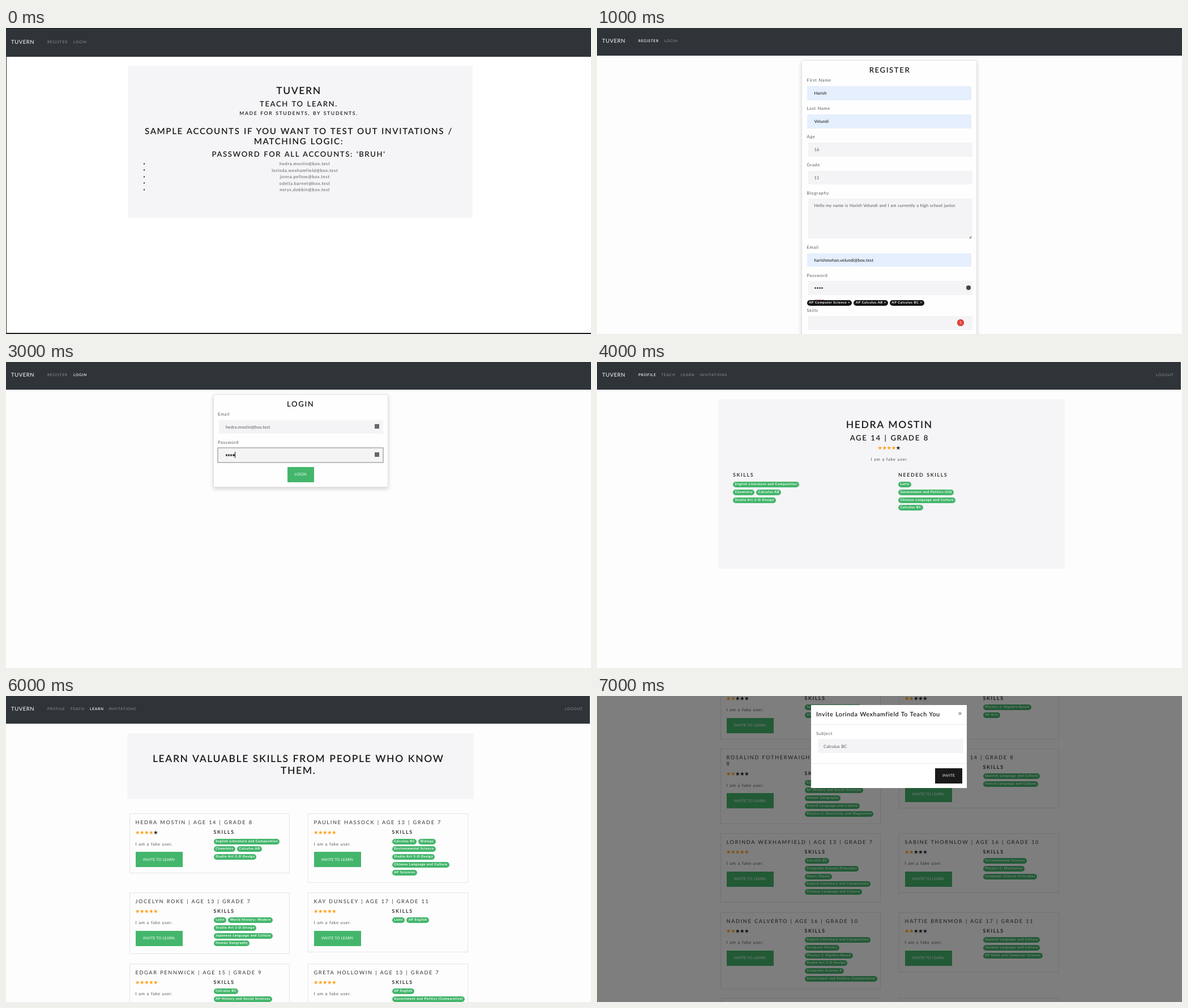
These frames come from a looping animation (1033x542 px, 8 s). An HTML page:

```html
<!DOCTYPE html>
<html lang="en">
<head>
<meta charset="utf-8">
<title>Peer teaching site tour</title>
<style>
html, body { margin: 0; width: 100%; height: 100%; overflow: hidden; background: #fff; }
#stage {
  position: relative; width: 1033px; height: 542px; overflow: hidden;
  font: 7.6px Lato, "Open Sans", sans-serif; color: #55595c;
  text-rendering: geometricPrecision;
}
#stage div { position: absolute; box-sizing: border-box; }
#stage .scene {
  inset: 0; overflow: hidden; background: #fdfdfd; visibility: hidden;
  animation: show 8s step-end infinite;
  animation-delay: calc(var(--i) * 1s - 8s);
}
@keyframes show {
  0% { visibility: visible; }
  12.5%, 100% { visibility: hidden; }
}

/* type; text is centred vertically on its top coordinate */
.t { line-height: 0; white-space: nowrap; }
.mid { width: 800px; text-align: center; }
.body { letter-spacing: .61px; word-spacing: .5px; }
.field { letter-spacing: .1px; word-spacing: .5px; }
.auto { color: #111; }
.h1, .h2, .h3, .h4, .title, .sub {
  color: #1a1a1a; font-weight: 600; letter-spacing: 1.62px; word-spacing: 1px; text-transform: uppercase;
}
.h1 { font-size: 17.5px; }
.h2 { font-size: 15.1px; }
.h3 { font-size: 13.1px; }
.h4 { font-size: 8.7px; }
.sub { font-size: 8.9px; }
.title { font-size: 9.2px; font-weight: 500; color: #444; word-spacing: .6px; }
.ask { font-size: 10.8px; font-weight: 600; color: #1a1a1a; letter-spacing: .54px; word-spacing: .6px; }
.close { font-size: 12px; color: #555; }
.brand { font-size: 9.5px; letter-spacing: .54px; color: #fff; }
.link { font-size: 6.5px; letter-spacing: .8px; color: #93969a; }
.on { color: #fff; font-weight: 600; }
.tip { font-size: 6.3px; letter-spacing: .3px; color: #eee; }

/* boxes */
.nav { background: #2f3439; }
.jumbo { background: #f5f5f7; }
.card { border: 1px solid #e4e4e4; }
.panel { background: #fefefe; border: 1px solid #e2e2e2; border-radius: 3px; box-shadow: 0 3px 7px rgba(0, 0, 0, .17); }
.input { background: #f4f4f6; }
.filled { background: #e5effd; }
.focus { background: #f4f4f5; border: 2px solid #bcbcbe; }
.btn {
  display: flex; align-items: center; justify-content: center; white-space: nowrap;
  background: #44b66c; color: #fff; font-size: 6.6px; letter-spacing: .15px;
}
.dark { background: #1a1a1a; }
.dot { border-radius: 50%; background: #444; }
.icon { background: #666; }
.rule { background: #e6e6e6; }
.star { background: #222; clip-path: polygon(50% 0, 62% 36%, 100% 36%, 69% 59%, 81% 96%, 50% 73%, 19% 96%, 31% 59%, 0 36%, 38% 36%); }
.gold { background: #ffa21f; }
.pills { display: flex; gap: 3px; height: 10px; }
.pills span {
  padding: 0 3.2px 0 3.7px; border-radius: 5px; line-height: 10px; white-space: nowrap;
  background: #44b66c; color: #fff; font-size: 5.8px; font-weight: 700;
  letter-spacing: .56px; word-spacing: .2px;
}
.tags span { background: #151515; }
.arrow { background: #151515; clip-path: polygon(0 0, 100% 0, 50% 100%); }
.grip { background: #999; clip-path: polygon(100% 0, 100% 100%, 0 100%); }
.shade { background: rgba(0, 0, 0, .5); }
</style>
</head>
<body>
<div id="stage"></div>
<script>
const BRAND = 'TUVERN', MAIL = '@box.test';

const box = (x, y, w, h, cls, inner = '') =>
  `<div class="${cls}" style="left:${x}px;top:${y}px;width:${w}px;height:${h}px">${inner}</div>`;
const text = (x, y, cls, str) =>
  `<div class="t ${cls}" style="left:${x}px;top:${y}px">${str}</div>`;
const mid = (x, y, cls, str) => text(x - 400, y, 'mid ' + cls, str);
const repeat = (n, fn) => Array.from({ length: n }, (_, i) => fn(i)).join('');
const dots = (x, y) => repeat(4, i => box(x + i * 4.1, y - 1.6, 3.3, 3.3, 'dot'));
const stars = (x, y, n) =>
  repeat(5, i => box(x + i * 8.05, y - 3.7, 7.4, 7.4, i < n ? 'star gold' : 'star'));

// one row of pills; labels are separated by "|"
const pills = (x, y, labels, cls = '') =>
  `<div class="pills ${cls}" style="left:${x}px;top:${y - 5}px">` +
  labels.split('|').map(s => `<span>${s}</span>`).join('') + '</div>';

function nav(y, h, w, links, active) {
  return box(0, 0, w, h, 'nav') + text(9, y, 'brand', BRAND) +
    links.map(([x, s]) => text(x, y, s === active ? 'link on' : 'link', s)).join('');
}
const guest = [[73, 'REGISTER'], [119, 'LOGIN']];
const member = [[73, 'PROFILE'], [113.5, 'TEACH'], [148, 'LEARN'], [181.5, 'INVITATIONS'], [987, 'LOGOUT']];

// person: [name, age, grade, rating, ...pill rows]
function card(col, y, person, verb, head, wrap = false) {
  const [name, age, grade, rating, ...rows] = person;
  const x = col ? 532.5 : 217.5, tx = x + 11, px = x + 149;
  const d = y + (wrap ? 11.5 : 0);
  const h = Math.max(106, 109.5 + (rows.length - 4) * 13.75) + d - y;
  const line = `${name} | Age ${age} | Grade`;
  return box(x, y, 283, h, 'card') +
    (wrap ? text(tx, y + 16, 'title', line) + text(tx, y + 27, 'title', grade)
          : text(tx, y + 16, 'title', `${line} ${grade}`)) +
    stars(tx, d + 33.8, rating) +
    text(px, d + 33, 'sub', head) +
    text(tx, d + 53.5, 'body', 'I am a fake user.') +
    box(tx, d + 68, 83, 27, 'btn', 'INVITE TO ' + verb) +
    rows.map((r, i) => pills(px, d + 49.5 + i * 13.75, r)).join('');
}
const grid = (tops, people, verb, head) =>
  people.map((p, i) => card(i % 2, tops[i >> 1], p, verb, head)).join('');

function home() {
  const users = ['hedra.mostin', 'lorinda.wexhamfield', 'jonna.pellow', 'odelia.barnet', 'nerys.dobbin'];
  return box(0, 0, 1033, 542, '" style="background:#fff') +
    box(0, 0, 1033, 542, 'bg') +
    nav(25.5, 50.5, 1033, guest) +
    box(0, 0, 1033, 1, 'dark') + box(0, 50, 1, 492, 'nav') + box(0, 539.5, 1033, 2.5, 'dark') +
    box(215, 66.5, 609, 269, 'jumbo') +
    mid(517, 111, 'h1', BRAND) +
    mid(517, 133.5, 'h3', 'Teach to learn.') +
    mid(517, 151, 'h4', 'Made for students, by students.') +
    mid(517, 182.5, 'h2', 'Sample accounts if you want to test out invitations /') +
    mid(517, 200.5, 'h2', 'matching logic:') +
    mid(517, 222.5, 'h3', "Password for all accounts: 'bruh'") +
    users.map((u, i) => box(242.6, 238.8 + i * 11.5, 2.8, 2.8, 'dot') +
      mid(527.7, 240 + i * 11.5, 'body', u + MAIL)).join('');
}

function form() {
  const label = (y, s) => text(370.5, y, 'body', s);
  const input = (y, s = '', h = 24.5) =>
    box(373, y, 290, h, 'input') + text(383.5, y + 12.2, 'field', s);
  const auto = (y, s) =>
    box(371, y, 290, 24.5, 'filled') + text(383.5, y + 12.2, 'field auto', s);
  const tags = (y, s) => pills(370.5, y, s, 'tags');
  const taken = 'AP Computer Science ×|AP Calculus AB ×|AP Calculus BC ×';
  return box(361, -105, 310, 646, 'panel') +
    mid(517, -88, 'h3', 'Register') +
    label(-70, 'First Name') + auto(-59, 'Harish') +
    label(-20, 'Last Name') + auto(-9, 'Velundi') +
    label(30, 'Age') + input(41, '16') +
    label(80, 'Grade') + input(90.5, '11') +
    label(130, 'Biography') +
    input(140, 'Hello my name is Harish Velundi and I am currently a high school junior.', 71) +
    box(656.5, 206, 4.5, 4.5, 'grip') +
    label(226, 'Email') + auto(236.5, 'harishmohan.velundi' + MAIL) +
    label(276, 'Password') + input(286) + dots(383.5, 298.5) +
    box(652.3, 294.3, 7.4, 7.4, 'dot') +
    box(384, 319, 17, 1.2, '" style="background:#ee8f96') +
    box(384, 319, 17, 1.2, 'pink') +
    tags(324.5, taken) + label(338, 'Skills') + input(348) +
    box(635.7, 353.7, 12.8, 12.8, 'btn dot" data-k="', '') +
    box(635.7, 353.7, 12.8, 12.8, 'btn badge', '1') +
    tags(386.5, taken) + label(400, 'Courses') + input(411) +
    tags(449, 'AP US History ×') + label(462, 'Skills Needed / Things') + input(472.5) +
    box(460.5, 445, 111, 24, 'dark') + box(512.5, 469, 7, 4, 'arrow') +
    mid(516, 452, 'tip', "Press ',' to add skill to list of") +
    mid(516, 462, 'tip', 'need-to-learn skills') +
    box(486, 506, 59.5, 26.5, 'btn', 'REGISTER');
}

function login() {
  return nav(24, 49, 1033, guest, 'LOGIN') +
    box(366, 57, 309, 165, 'panel') +
    mid(520.3, 74, 'h3', 'Login') +
    text(374, 92, 'body', 'Email') +
    box(376, 102.5, 290, 24.5, 'input') + text(388, 114.5, 'field', 'hedra.mostin' + MAIL) +
    box(651, 109.5, 8, 8, 'icon') +
    text(374, 142, 'body', 'Password') +
    box(373, 151, 293.5, 27.5, 'focus') + dots(388, 165) + box(403.8, 159, 1, 11, 'dark') +
    box(651, 159.5, 8, 8, 'icon') +
    box(497, 186, 46.5, 26.5, 'btn', 'LOGIN');
}

const banner = (a, b) => box(214, 66, 612, 115.5, 'jumbo') +
  mid(516.3, 110.5, 'h1', a) + mid(516.3, 131.5, 'h1', b);

const lit = 'English Literature and Composition', gov = 'Government and Politics',
  chinese = 'Chinese Language and Culture', phys = 'Physics 1: Algebra-Based',
  env = 'Environmental Science', csp = 'Computer Science Principles',
  art2 = 'Studio Art 2-D Design', art3 = 'Studio Art 3-D Design',
  spanish = 'Spanish Language and Culture', french = 'French Language and Culture',
  history = 'AP History and Social Sciences';

const hedraNeeds = ['Latin', gov + ' (US)', chinese, 'Calculus BC'];
const hedraSkills = [lit, 'Chemistry|Calculus AB', art2];

function profile() {
  return nav(24, 49, 1031, member, 'PROFILE') +
    box(214, 66, 612, 300, 'jumbo') +
    mid(516.3, 110.5, 'h1', 'Hedra Mostin') +
    mid(516.3, 133.5, 'h3', 'Age 14 | Grade 8') +
    stars(496, 152, 4) +
    mid(516.3, 172, 'body', 'I am a fake user.') +
    text(240, 200, 'sub', 'Skills') + text(532, 200, 'sub', 'Needed skills') +
    hedraSkills.map((r, i) => pills(240, 217 + i * 13.75, r)).join('') +
    hedraNeeds.map((r, i) => pills(532, 217 + i * 13.75, r)).join('');
}

function teach() {
  return nav(24, 49, 1031, member, 'TEACH') +
    banner('Teach the skills you know in order to get more', 'from others in the future.') +
    grid([208, 333.5, 459.5], [
      ['Hedra Mostin', 14, 8, 4, ...hedraNeeds],
      ['Tessa Wardimore', 16, 10, 3, phys, art3, 'Calculus AB|US History', 'Music Theory'],
      ['Ned Foss', 13, 7, 3, 'Chemistry', lit],
      ['Melinda Corvey', 14, 8, 3, 'Microeconomics|Biology', 'Calculus AB', lit, phys],
      ['Jocelyn Roke', 13, 7, 5, 'AP World Languages and Cultures', 'AP Seminar', lit],
      ['Kay Dunsley', 17, 11, 5, env, csp, lit]
    ], 'TEACH', 'Needed skills');
}

function learn() {
  return nav(24, 49, 1031, member, 'LEARN') +
    banner('Learn valuable skills from people who know', 'them.') +
    grid([208, 347.5, 473.5], [
      ['Hedra Mostin', 14, 8, 4, ...hedraSkills],
      ['Pauline Hassock', 13, 7, 5, 'Calculus BC|Biology', env, art3, chinese, 'AP Sciences'],
      ['Jocelyn Roke', 13, 7, 5, 'Latin|World History: Modern', art2, 'Japanese Language and Culture', 'Human Geography'],
      ['Kay Dunsley', 17, 11, 5, 'Latin|AP English'],
      ['Edgar Pennwick', 15, 9, 5, 'Calculus BC', history],
      ['Greta Hollowin', 13, 7, 5, 'AP English', gov + ' (Comparative)']
    ], 'LEARN', 'Skills');
}

function invite() {
  const at = (col, y, p, wrap) => card(col, y, p, 'LEARN', 'Skills', wrap);
  return at(0, -29.5, ['', '', '', 2, spanish, 'AP Arts']) +
    at(1, -29.5, ['', '', '', 2, phys, 'AP Arts']) +
    at(0, 92.5, ['Rosalind Fotherwaigh', 14, 8, 2, env, history, 'Human Geography', french,
      'Physics C: Electricity and Magnetism'], true) +
    at(1, 92.5, ['Ada Wensle', 14, 8, 2, spanish, french]) +
    at(0, 242.5, ['Lorinda Wexhamfield', 13, 7, 5, 'Calculus BC', csp, 'Music Theory', lit, chinese]) +
    at(1, 242.5, ['Sabine Thornlow', 16, 10, 2, env, 'Physics C: Mechanics', csp]) +
    at(0, 382.5, ['Nadine Calverto', 16, 10, 2, lit, 'European History', phys, art3,
      'Computer Science A', gov + ' (Comparative)']) +
    at(1, 382.5, ['Hattie Brenmor', 17, 11, 2, spanish, 'German Language and Culture',
      'AP Math and Computer Science']) +
    box(217.5, 535, 283, 20, 'card') + box(532.5, 535, 283, 20, 'card') +
    box(0, 0, 1033, 542, 'shade') +
    box(378, 16, 275, 147, 'white') +
    text(387, 33, 'ask', 'Invite Lorinda Wexhamfield To Teach You') +
    text(637.5, 31, 'close', '×') +
    box(378, 50, 275, 1, 'rule') +
    text(387, 65.5, 'body', 'Subject') +
    box(390, 76, 257, 25, 'input') + text(400, 88.5, 'field', 'Calculus BC') +
    box(378, 118.5, 275, 1, 'rule') +
    box(597, 128, 48, 26.5, 'btn dark', 'INVITE');
}

const register = () => nav(24, 49, 1033, guest, 'REGISTER') + box(0, 162, 1033, 380, 'page', form());

const extra = document.createElement('style');
extra.textContent = `
  .bg, .white { background: #fff; }
  .pink { background: #ee8f96; }
  .badge { border-radius: 50%; background: #e5403c; }`;
document.head.append(extra);

document.getElementById('stage').innerHTML =
  [home, register, form, login, profile, teach, learn, invite]
    .map((draw, i) => `<div class="scene" style="--i:${i}">${draw()}</div>`).join('');
</script>
</body>
</html>
```
